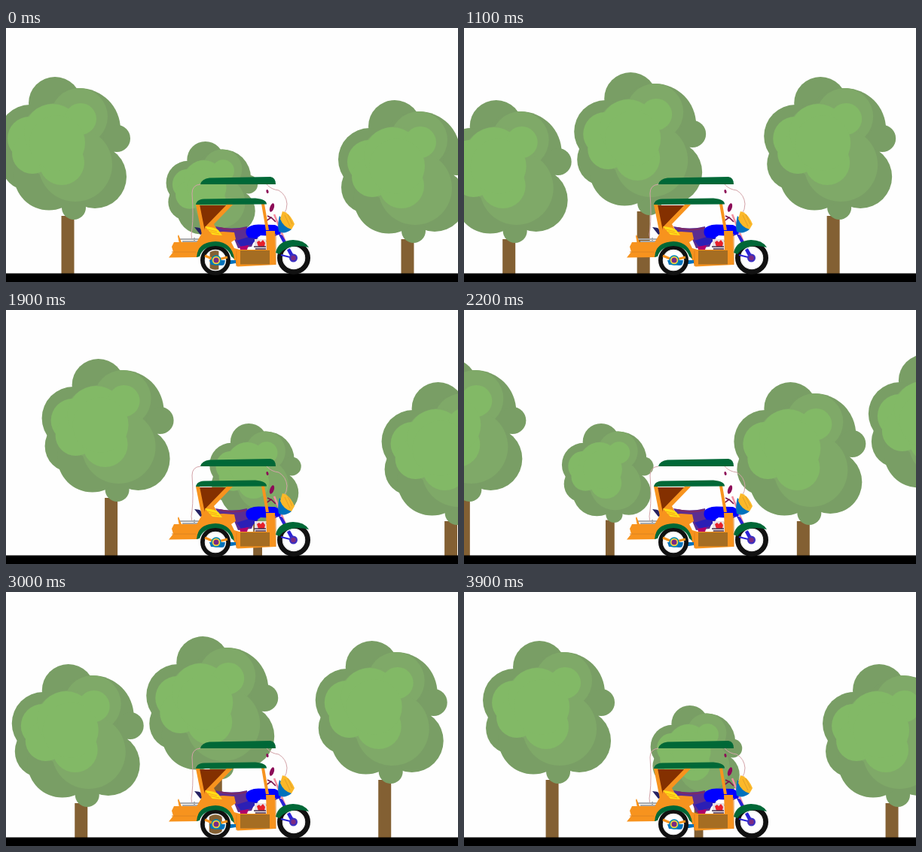
Animation of 600x338 px, one loop 4000 ms. Source, as an HTML page:

```html
<!DOCTYPE html>
<html>
<head>
<meta charset="utf-8">
<style>
html, body { margin: 0; width: 100%; height: 100%; overflow: hidden; background: #fefefe; }
svg { display: block; width: 600px; height: 338px; }
</style>
</head>
<body>
<svg viewBox="0 0 600 338">
  <defs><g id="tree"></g></defs>
  <g id="trees"></g>
  <rect y="326.5" width="600" height="11.5" fill="#000"/>

  <g id="tricycle">
    <!-- cables -->
    <g fill="none" stroke="#d3a3a8" stroke-width="1">
      <path d="M258 208Q247 209 247 220Q249 250 247 267Q245 275 247 282"/>
      <path d="M346 208Q352 215 362 216Q372 222 373 234Q373 242 369 247"/>
    </g>

    <!-- motorcycle body -->
    <path d="M250 265L257 266L264 273L258 275Z" fill="#262262"/>
    <path d="M278 264Q300 269 320 264L322 276L331 279L326 291L308 293L303 281L285 277Z" fill="#5c2d91"/>
    <path d="M284 266Q303 271 319 266" fill="none" stroke="#7b2a68" stroke-width="2"/>
    <path d="M306 283L322 278L335 279L326 288L312 291Z" fill="#2b1fb5"/>
    <path d="M310 291L322 289L320 295L311 295Z" fill="#b0006a"/>
    <path d="M319 268Q322 262 335 261.500L357 262L365 266L366 273L357 277L338 276L332 280L322 279Q317 274 319 268Z" fill="#0000ff"/>
    <path d="M330 281h17v15h-17z" fill="#e8dfe3"/>
    <path d="M333 285l3 -2 2 2 3 -3 3 4 -1 5h-8z" fill="#e5202b"/>
    <path d="M329 291h16M331 294h14M346 283l4 9" stroke="#453050" stroke-width="1.500"/>

    <!-- handlebar, fork, headlight -->
    <path d="M345 257L352 252L358 258M347 250l6 3" fill="none" stroke="#7a174f" stroke-width="1.700"/>
    <path d="M356 248L371 285" stroke="#f48ea0" stroke-width="2.500"/>
    <path d="M361 273L367 276L383 304L379 307Z" fill="#2a22d6"/>
    <path d="M363 250Q360 262 362 271Q370 275 379 268Z" fill="#0071bc"/>
    <path d="M367 244Q377 246 383 261L379 268Q368 265 364 254Z" fill="#fbb829"/>
    <path d="M370 249L377 264M374 248L380 261" stroke="#d99a2b" stroke-width=".8"/>
    <ellipse cx="353" cy="239" rx="2.700" ry="6" transform="rotate(18 353 239)" fill="#8c0b57"/>
    <ellipse cx="347" cy="217.500" rx="1.500" ry="2.600" transform="rotate(-15 347 217.500)" fill="#8c0b57"/>

    <!-- rear tray and cabin -->
    <path d="M231 281H260M234 284H259M250 279v6" stroke="#a7a9ac" stroke-width="2"/>
    <path d="M229 275L233 285L230 287L228 277Z" fill="#f7931e"/>
    <path d="M223 285H266L254 305L216 305.500L222 298L220 291Z" fill="#f7931e"/>
    <path d="M220 298H252" stroke="#de8420" stroke-width="1"/>
    <path d="M255 236H298L264 273Z" fill="#843000"/>
    <path d="M252 235H257L265 275H260Z" fill="#f7931e"/>
    <path d="M293 235H301L276 261L282 272L262 275L264 265Z" fill="#f7931e"/>
    <path d="M260 273L288 271L303 272L305 281L299 285L303 293L310 295H346L345 270H357L358 315L307 317.500L299 300L291 289L264 288L255 299L252 287Z" fill="#f7931e"/>
    <path d="M339 234H343L349 269H345Z" fill="#f7931e"/>
    <path d="M264 264Q277 265 282 269L287 276L274 275Z" fill="#ffdf17"/>
    <path d="M268 268L280 271M271 271L283 274" stroke="#f7931e" stroke-width=".8"/>
    <rect x="311" y="296" width="39" height="18.500" fill="#a56d22"/>
    <path d="M306 296V317M358 274V315" stroke="#e0811a" stroke-width="1"/>

    <!-- rear wheel -->
    <path d="M270 309H305V313L286 316L272 315Z" fill="#0071bc"/>
    <circle cx="278" cy="309" r="17" fill="none" stroke="#111" stroke-width="6"/>
    <circle cx="278" cy="309" r="13.500" fill="none" stroke="#ededed" stroke-width="1.500"/>
    <path d="M264 303L278 309L294 305" fill="none" stroke="#f7931e" stroke-width="3"/>
    <circle cx="279" cy="309" r="6" fill="#f5d43b" stroke="#0086b3" stroke-width="1.500"/>
    <circle cx="279" cy="309" r="3.500" fill="#7b2a83"/>
    <path d="M253 305Q254 285 278 284Q300 285 303 307L299 304Q295 291 278 290Q261 291 257 304Z" fill="#006837"/>

    <!-- front wheel -->
    <circle cx="382" cy="306" r="18.500" fill="none" stroke="#111" stroke-width="7"/>
    <circle cx="382" cy="306" r="14.500" fill="none" stroke="#ededed" stroke-width="1.500"/>
    <path d="M365 302L381 306" stroke="#2a22d6" stroke-width="2"/>
    <circle cx="381.500" cy="306" r="5.500" fill="#3b2fc0"/>
    <circle cx="381.500" cy="306" r="3.200" fill="#7b2a83"/>
    <path d="M358 299Q361 283 381 282Q396 282 402 292Q386 288 376 292Q367 295 363 301Z" fill="#006837"/>

    <!-- roofs -->
    <path d="M258 208Q260 200.500 270 199.500L351 198Q358 199 358 208Z" fill="#006837"/>
    <path d="M252 235Q253 228 263 227.500L331 226.500Q346 228 346 234.500Z" fill="#006837"/>
  </g>
</svg>
<script>
const NS = "http://www.w3.org/2000/svg";
const tree = document.getElementById("tree");
const trees = document.getElementById("trees");

function add(parent, tag, attrs) {
  const el = document.createElementNS(NS, tag);
  for (const key in attrs) el.setAttribute(key, attrs[key]);
  return parent.appendChild(el);
}

function blobs(fill, list) {
  for (const [cx, cy, r] of list) add(tree, "circle", { cx, cy, r, fill });
}

// Crown circles: x from the trunk's centre, y on the stage, radius.
blobs("#799e65", [
  [-17, 100, 35], [15, 135, 55], [65, 147, 18], [36, 198, 42],
  [8, 239, 16], [-50, 144, 42], [-53, 181, 35], [-25, 196, 46.5]
]);
blobs("#7fa968", [[15, 118, 38], [-15, 150, 50], [10, 182, 49]]);
blobs("#82b966", [
  [-51, 147, 29], [-47, 167, 27], [-20, 139, 38],
  [17, 121, 21], [-8, 179, 30], [-14, 153, 37]
]);

// Each kind: x within a row, crown top, scale.
const kinds = [[82, 65, 1], [276.5, 151, 0.695], [533, 96, 1], [711.5, 59, 1]];
const STEP = 17.53, STEPS = 99, SPAN = STEP * STEPS, ROW = 881.5;
const placed = [];

for (const row of [0, ROW]) {
  for (const [x, top, k] of kinds) {
    const g = add(trees, "g", {});
    const y = top + 185 * k;
    add(g, "rect", { x: -8.5 * k, y, width: 17 * k, height: 327 - y, fill: "#836033" });
    add(g, "use", { href: "#tree", transform: `translate(0 ${top - 65 * k}) scale(${k})` });
    placed.push({ g, x: x + row });
  }
}

function draw(ms) {
  const t = Math.floor((ms % 4000) / 100) * 100;
  const shift = (Math.floor(t / 40) % STEPS) * STEP;
  for (const { g, x } of placed) {
    let px = x - shift;
    if (px < -100) px += SPAN;
    g.setAttribute("transform", `translate(${px.toFixed(2)} 0)`);
  }
}

const start = performance.now();
function tick() {
  draw(performance.now() - start);
  requestAnimationFrame(tick);
}
draw(0);
requestAnimationFrame(tick);
</script>
</body>
</html>
```
